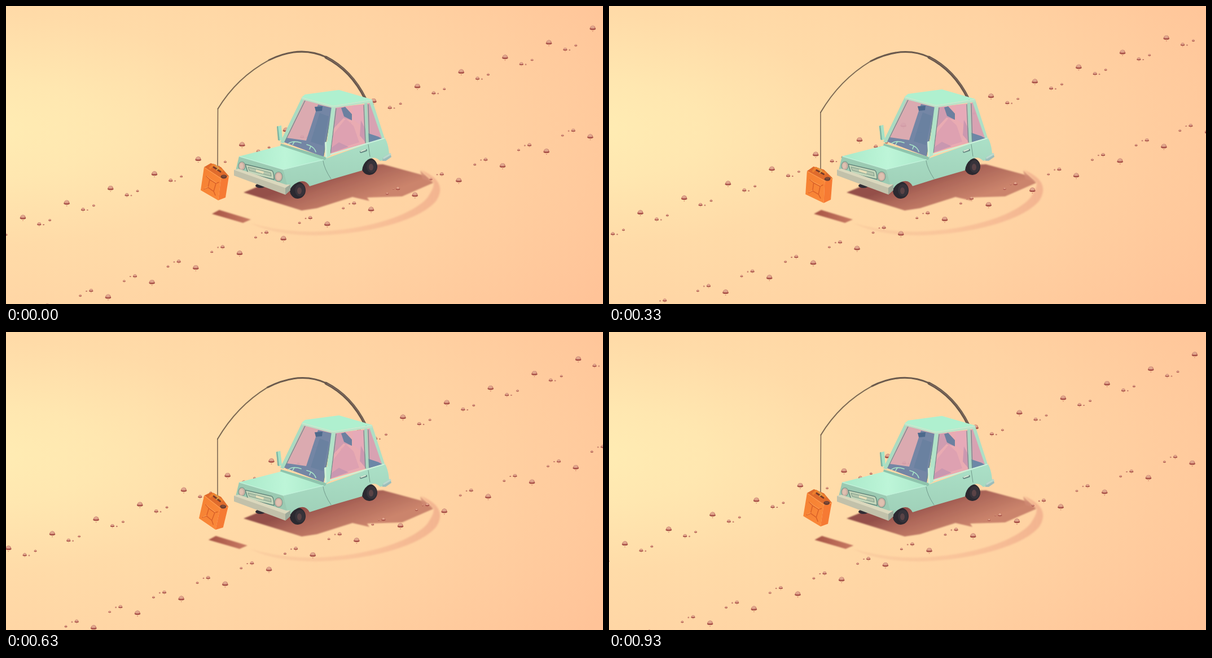
Write an HTML page that moves like this. It is 1058 px wide and 529 px high and loops after 0.96 s.

```html
<!DOCTYPE html>
<html lang="en">
<head>
<meta charset="utf-8">
<title>Desert drive</title>
<style>
html, body { margin: 0; width: 100%; height: 100%; overflow: hidden; background: #ffd8a6; }
svg { display: block; width: 100%; height: 100%; }
.line { fill: none; stroke-linecap: round; stroke-linejoin: round; }
</style>
</head>
<body>
<svg viewBox="0 0 1058 529" preserveAspectRatio="none">
  <defs>
    <radialGradient id="sand" gradientUnits="userSpaceOnUse" cx="0" cy="0" r="1" gradientTransform="translate(-20 220) scale(1250 570)">
      <stop offset="0" stop-color="#ffecb3"/>
      <stop offset=".15" stop-color="#ffe7b0"/>
      <stop offset=".36" stop-color="#ffdba8"/>
      <stop offset=".65" stop-color="#ffd3a3"/>
      <stop offset="1" stop-color="#ffc398"/>
    </radialGradient>
    <linearGradient id="shade" gradientUnits="userSpaceOnUse" x1="560" y1="302" x2="582" y2="364">
      <stop offset="0" stop-color="#94504a"/>
      <stop offset=".35" stop-color="#ad6759"/>
      <stop offset="1" stop-color="#cb846c"/>
    </linearGradient>
    <linearGradient id="canShade" x1="0" x2="1">
      <stop offset="0" stop-color="#a65345"/>
      <stop offset="1" stop-color="#c97c64"/>
    </linearGradient>
    <linearGradient id="arcShade" gradientUnits="userSpaceOnUse" x1="430" y1="0" x2="770" y2="0">
      <stop offset="0" stop-color="#e9a888" stop-opacity=".2"/>
      <stop offset=".5" stop-color="#f0a888" stop-opacity=".35"/>
      <stop offset="1" stop-color="#e99b80" stop-opacity=".55"/>
    </linearGradient>
    <linearGradient id="hood" x1="0" x2="1">
      <stop offset="0" stop-color="#a9e9c9"/>
      <stop offset=".55" stop-color="#bdf5d8"/>
      <stop offset="1" stop-color="#abe8ca"/>
    </linearGradient>
    <linearGradient id="side" x1="0" y1="0" x2="0" y2="1">
      <stop offset="0" stop-color="#abe0c7"/>
      <stop offset="1" stop-color="#9fd0b8"/>
    </linearGradient>
    <linearGradient id="canFront" x1="0" y1="0" x2="1" y2="1">
      <stop offset="0" stop-color="#f48132"/>
      <stop offset="1" stop-color="#fb883a"/>
    </linearGradient>
    <filter id="soft"><feGaussianBlur stdDeviation=".8"/></filter>
    <filter id="softer" x="-10%" y="-20%" width="120%" height="140%"><feGaussianBlur stdDeviation="1.8"/></filter>
    <g id="rock">
      <ellipse cx=".5" cy="1.500" rx="5.500" ry="2.200" fill="#9c453d"/>
      <path d="M-5 1.500C-4.500-2-2-4.500 .5-4.500C3.500-4.500 5.500-2 5.500 1.500Q.5 3-5 1.500Z" fill="#b9655a"/>
      <path d="M-4 0C-3-3-1.500-4.500 .5-4.500C2.500-4.500 4-2.500 4.500 0Q.5 1.500-4 0Z" fill="#e0a68d"/>
      <circle cx=".5" cy="6" r=".9" fill="#c96f5b" opacity=".7"/>
    </g>
    <g id="wheel">
      <ellipse rx="14" ry="15" fill="#2b2930"/>
      <ellipse cx="4" rx="9" ry="11" fill="#37333a"/>
      <ellipse cx="3" cy="1" rx="4" ry="6" fill="#5a4346"/>
    </g>
  </defs>

  <rect width="1058" height="529" fill="url(#sand)"/>

  <path d="M735 291Q784 311 763 345C736 379 650 403 560 407Q480 409 432 385Q495 403 560 400C640 396 720 372 747 340Q761 319 757 313Z" fill="url(#arcShade)" filter="url(#softer)"/>
  <path d="M421 331L524 363L551 359L614 339L644 346L640 340L702 338L757 314L742 301L668 281L560 285L460 315Z" fill="url(#shade)" filter="url(#soft)"/>
  <path d="M734 292L757 313L738 307Z" fill="#d08a73" opacity=".8" filter="url(#soft)"/>
  <path id="canShadow" d="M365 369L378 362L434 379L420 385Z" fill="url(#canShade)" filter="url(#soft)"/>
  <g id="rocks"></g>

  <g class="line">
    <path id="rodMid" stroke="#6b5a4d" stroke-width="3"/>
    <path d="M637 165Q612 114 567 91" stroke="#67564b" stroke-width="5"/>
    <path d="M635 160Q612 114 569 92" stroke="#7d695c" stroke-width="1.500"/>
    <path id="rodTip" stroke="#7b6853" stroke-width="2"/>
    <path id="string" stroke="#75614f" stroke-width="1.500"/>
  </g>

  <g id="car">
    <ellipse cx="451" cy="319" rx="9" ry="4" fill="#302c34"/>
    <use href="#wheel" x="644" y="285"/>
    <use href="#wheel" x="517" y="327"/>

    <g id="cabin">
      <path d="M528 166L578 180L563 268L491 241Z" fill="#d7a6b2" fill-opacity=".9"/>
      <path d="M553 175L578 181L563 268L491 241L497 234L532 239Z" fill="#6c84a4" fill-opacity=".92"/>
      <path d="M556 190L572 196L562 248L540 241Z" fill="#5b7898" opacity=".4"/>
      <path d="M547 179L561 178L560 186L549 187Z" fill="#4c698c"/>
      <path d="M583 180L636 174L640 243L572 263Z" fill="#e8a8b3" fill-opacity=".94"/>
      <path d="M584 181L597 180L612 193L613 203L598 199L580 218Z" fill="#cf9cb0"/>
      <path d="M594 181L601 179L613 192L613 203L599 196Z" fill="#6b80a0"/>
      <path d="M602 200L616 213L626 242L574 258L578 230Z" fill="#dea1b1"/>
      <path d="M614 177L635 175L637 218L616 202Z" fill="#e6aab8"/>
      <path d="M573 254L590 242L607 250L573 262Z" fill="#c997b0"/>
      <path d="M629 203L638 220L638 243L627 230Z" fill="#cb98b0"/>
      <path d="M640 173L647 172L668 235L642 243Z" fill="#d6a0b4" fill-opacity=".95"/>
      <path d="M642 226L660 232L667 236L642 243Z" fill="#6c87a7"/>
      <g class="line" stroke="#6b8d8b" stroke-width="1.200">
        <path d="M530 168L495 239M577 184L563 264M585 182L575 261M634 176L637 243M642 175L644 241"/>
      </g>
      <path d="M524 163L529 165L492 244L486 242Z" fill="#a9dcc1"/>
      <path d="M577 178L584 179L574 266L565 271Z" fill="#b1e3c8"/>
      <path d="M635 172L640 171L643 243L638 245Z" fill="#a8d7c0"/>
      <path d="M643 168L649 167L671 235L667 238Z" fill="#aedfc5"/>
      <path d="M524 162L580 177L649 166L649 171L581 181L524 166Z" fill="#bce2c8"/>
      <path d="M524 162L530 157L590 149L649 166L580 177Z" fill="#aff0cf"/>
      <path d="M525 163L580 178L648 167" class="line" stroke="#c9f1d9" stroke-width="1"/>
    </g>

    <g id="body">
      <path d="M491 290L566 271L642 244L672 235Q678 246 679 263L674 273L663 275Q654 265 641 273Q632 280 631 292L576 308L538 320Q531 307 517 313Q506 318 503 327L496 320Z" fill="url(#side)"/>
      <path d="M570 265L640 244L670 235" class="line" stroke="#c9f1dc" stroke-width="2"/>
      <path d="M487 244L566 268L570 265L566 273L559 274Q525 263 486 249Z" fill="#8fc4ad"/>
      <path d="M413 267L487 248L562 273L491 291Z" fill="url(#hood)"/>
      <path d="M413 267L491 290L499 320L407 292Z" fill="#9bcab2"/>
      <path d="M414 267L491 290L562 273" class="line" stroke="#c0f1d9" stroke-width="1.500"/>
      <path d="M424 281L471 292Q475 294 475 308L429 297Z" fill="#c3d6ba" stroke="#5b7d74" stroke-width="1.300"/>
      <path d="M429 286L469 296L470 302L431 292Z" fill="#b3c5ac" stroke="#71907f" stroke-width=".8"/>
      <path d="M443 290L457 294L456 298L443 294Z" fill="#e7dfb9"/>
      <g fill="#cdb0a3" stroke="#7c9f90" stroke-width="1.200">
        <ellipse cx="418" cy="284" rx="6" ry="7.500"/>
        <ellipse cx="483" cy="303" rx="7" ry="8.500"/>
      </g>
      <ellipse cx="417" cy="284" rx="3.500" ry="5" fill="#dfc0b0"/>
      <ellipse cx="483" cy="303" rx="4.500" ry="6" fill="#dfc0b0"/>
      <path d="M404 291L412 289L496 318L504 317L504 327L495 335L404 301Z" fill="#c2c1aa"/>
      <path d="M404 291L412 289L496 317L504 317L495 323Z" fill="#dbd8bd"/>
      <path d="M495 323L504 317L504 327L495 335Z" fill="#9eaa9a"/>
      <path d="M668 269L681 261L683 268L673 275L667 275Z" fill="#9dbdba"/>
      <path d="M668 269L681 261L683 264L669 272Z" fill="#bad9ce"/>
      <g class="line">
        <path d="M562 275Q564 289 576 307M642 246L645 267" stroke="#729a8c" stroke-width="1"/>
        <path d="M629 259L638 256" stroke="#668783" stroke-width="4"/>
        <path d="M629 258L637 255" stroke="#d9ead6" stroke-width="2"/>
        <path d="M501 244Q509 238 523 243M533 246Q546 249 549 259M511 241L508 246M540 249L538 254" stroke="#a7e4c7" stroke-width="1.600"/>
      </g>
    </g>
    <g id="mirrors">
      <path id="leftMirror" d="M480 214L488 212L490 238L483 239Z" fill="#a6e1c5"/>
      <path d="M480 214L482 213L485 239L482 238Z" fill="#7fb3a1"/>
      <path d="M565 242L574 239L575 266L567 270Z" fill="#b5e8cd"/>
      <path d="M565 242L568 241L569 268L566 269Z" fill="#d0efd7"/>
    </g>
  </g>

  <g id="can">
    <path d="M351 286L363 279L381 286L395 302L381 306Z" fill="#df6b2c"/>
    <path d="M351 286L381 306L376 345L345 327Z" fill="url(#canFront)"/>
    <path d="M381 306L395 302L389 340L376 345Z" fill="#f67a33"/>
    <g class="line">
      <path d="M352 287L381 306L395 303" stroke="#ff9c4f" stroke-width="1.200"/>
      <path d="M355 302L361 308L372 315L377 313M351 325L358 322L368 329L371 336M361 308L358 322M372 315L368 329" stroke="#da6128" stroke-width="1.500"/>
      <path d="M356 302L362 307L373 314M352 324L358 321" stroke="#ffad61" stroke-width=".8"/>
      <path d="M362 287L367 282L383 292" stroke="#ed812f" stroke-width="4"/>
      <path d="M368 286L380 294" stroke="#743b29" stroke-width="3"/>
      <path d="M372 283L377 288L373 291" stroke="#dba14b" stroke-width="2"/>
    </g>
    <ellipse cx="386" cy="303" rx="5.500" ry="3.500" fill="#683d30"/>
    <ellipse cx="386" cy="302" rx="3.500" ry="2" fill="#7f4937"/>
  </g>
</svg>
<script>
const LOOP = 960, STEP = 30;
const PITCH = { x: 77.68, y: -25.85 };
const get = id => document.getElementById(id);
const set = (id, name, value) => get(id).setAttribute(name, value);

// Each cluster holds one boulder and smaller stones: dx, dy, scale.
const clusters = [
  { x: 29.5, y: 375, stones: [[0, 0, .95], [29, 12, .65], [37, 13, .25], [48, 5, .45]] },
  { x: 180.5, y: 516, stones: [[0, 0, .95], [-30, -11, .65], [-38, -10, .25], [-49, -2, .45]] }
];
let rocks = '';
for (const { x, y, stones } of clusters)
  for (let i = -4; i < 15; i++)
    for (const [dx, dy, scale] of stones)
      rocks += `<use href="#rock" transform="translate(${x + i * PITCH.x + dx} ${y + i * PITCH.y + dy}) scale(${scale})"/>`;
get('rocks').innerHTML = rocks;

// Steady travel that slows gently around the loop point; returns pixels along x.
function travel(t) {
  const frame = t / STEP;
  const g = frame > 16 ? frame - 32 : frame;
  const a = Math.abs(g);
  const d = a < 8 ? 2.215 * a - 1.082 * Math.sin(Math.PI * a / 8) : 17.72 + 2.64 * (a - 8);
  return Math.sign(g) * d + (frame > 16 ? PITCH.x : 0);
}

function draw(t) {
  const angle = 2 * Math.PI / LOOP;
  const wave = delay => Math.cos(angle * (t - delay));
  const x = travel(t);
  set('rocks', 'transform', `translate(${x} ${x * PITCH.y / PITCH.x})`);

  const bounce = Math.cos(2 * angle * t) - 1;
  set('cabin', 'transform', `translate(0 ${bounce * .8})`);
  set('body', 'transform', `translate(0 ${bounce * .2})`);
  set('mirrors', 'transform', `translate(${bounce * .6} ${bounce * .7})`);
  set('leftMirror', 'transform', `rotate(${bounce * 1.5} 487 239)`);

  const dip = 4.6 - 4.6 * wave(20);
  const tipX = 375.5 - dip * .08, tipY = 182.4 + dip;
  const midX = 466 - dip * .35, midY = 96 + dip * .3;
  set('rodMid', 'd', `M568 91Q521 69 ${midX} ${midY}`);
  set('rodTip', 'd', `M${midX} ${midY}Q409 ${127 + dip * .6} ${tipX} ${tipY}`);

  const bob = 3.6 - 3.6 * wave(30);
  const swing = Math.sin(angle * t);
  set('string', 'd', `M${tipX} ${tipY}L375 ${288 + bob}`);
  set('can', 'transform', `translate(0 ${bob}) rotate(${-5.5 * swing} 375 288)`);
  set('canShadow', 'transform', `translate(${3.6 * wave(120) - 2.6} 0)`);
}

function tick() {
  draw(Math.floor(performance.now() % LOOP / STEP) * STEP);
  requestAnimationFrame(tick);
}
tick();
</script>
</body>
</html>
```
